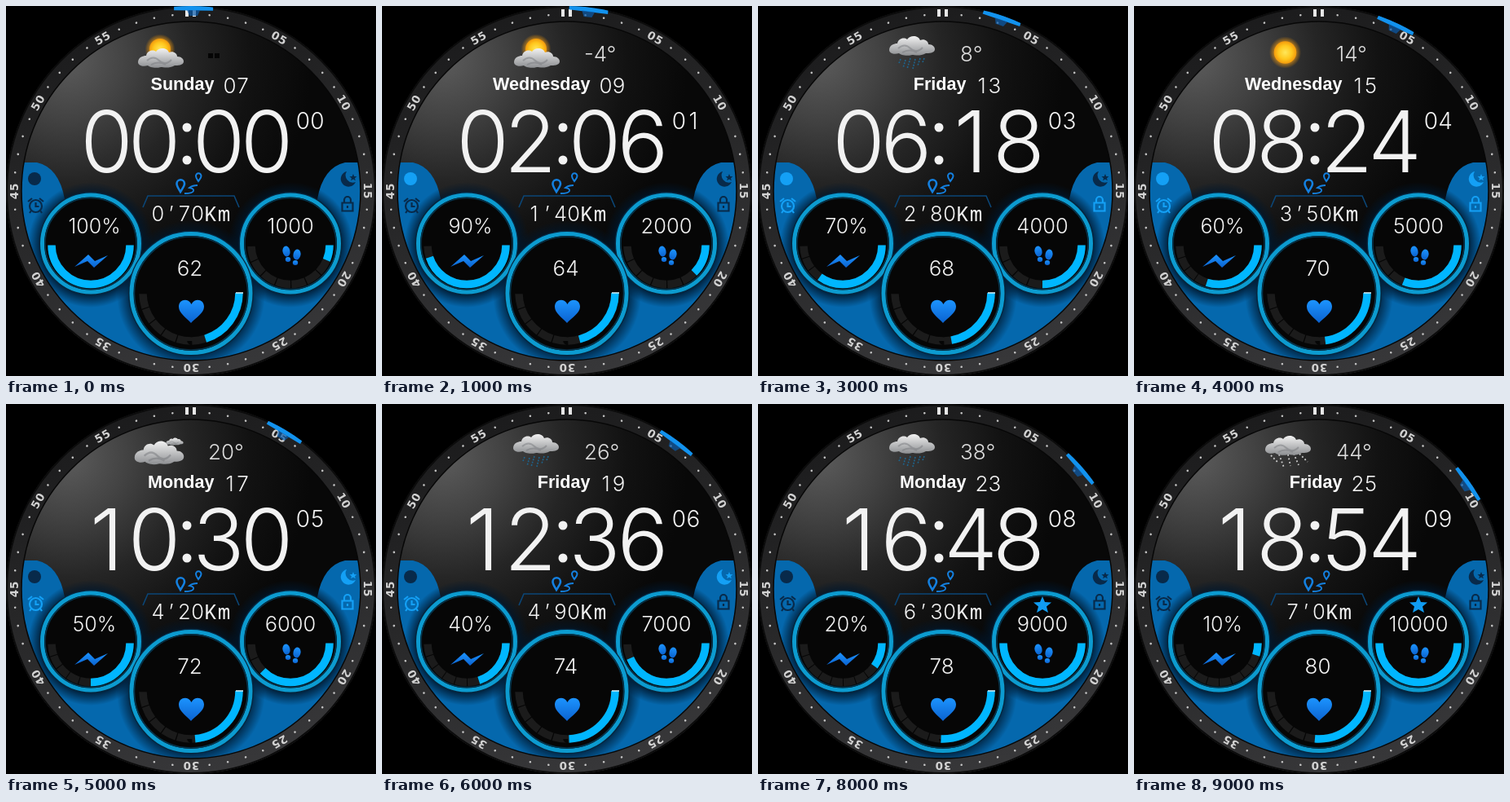
Animation, 454 px wide and 454 px high, one loop 10 s. Source, as an HTML page:

```html
<!DOCTYPE html>
<html lang="en">
<head>
<meta charset="utf-8">
<title>Watch face</title>
<style>
html, body { margin: 0; width: 100%; height: 100%; overflow: hidden; background: #000; }
svg { display: block; width: 100vw; height: 100vh; }
text { font-family: Inter, Roboto, sans-serif; font-weight: 300; fill: #f2f2f2; text-anchor: middle; }
#labels text { font: 700 13.5px "DejaVu Sans", sans-serif; fill: #d2d2d2; letter-spacing: .8px; }
#weekday { font: 700 21.6px "Liberation Sans", Arial, sans-serif; fill: #fff; text-anchor: end; }
#unit { font-family: "Noto Sans Mono", monospace; }
#temp { text-anchor: start; fill: #ddd; }
.dim, .lit { fill: none; stroke-width: 9.5; }
.dim { stroke: #1b1b1b; }
.lit { stroke: #00b6ff; }
.status { color: #082a4a; fill: none; stroke: currentColor; stroke-width: 2.2; }
.status.on { color: #14a0f5; }
.solid { fill: currentColor; stroke: none; }
#weather > g { visibility: hidden; }
</style>
</head>
<body>
<svg viewBox="0 0 454 454">
<defs>
  <clipPath id="rim"><circle cx="227" cy="227" r="227"/></clipPath>
  <clipPath id="dial"><circle cx="227" cy="227" r="208"/></clipPath>
  <linearGradient id="bezel" x1=".35" y1="0" x2=".65" y2="1">
    <stop stop-color="#1b1b1c"/><stop offset=".45" stop-color="#272728"/><stop offset="1" stop-color="#38383a"/>
  </linearGradient>
  <radialGradient id="glass" gradientUnits="userSpaceOnUse" cx="75" cy="65" r="300">
    <stop stop-color="#5c5c5c"/><stop offset=".25" stop-color="#424242"/>
    <stop offset=".5" stop-color="#252525"/><stop offset=".75" stop-color="#121212"/><stop offset="1" stop-color="#080808"/>
  </radialGradient>
  <radialGradient id="shade">
    <stop offset=".8" stop-color="#00172d" stop-opacity=".85"/><stop offset="1" stop-color="#00172d" stop-opacity="0"/>
  </radialGradient>
  <radialGradient id="sunFill">
    <stop stop-color="#ffe75a"/><stop offset=".6" stop-color="#ffc81e"/><stop offset="1" stop-color="#f39a0c"/>
  </radialGradient>
  <radialGradient id="glow">
    <stop offset=".55" stop-color="#ffad1c" stop-opacity=".8"/><stop offset="1" stop-color="#ff9a00" stop-opacity="0"/>
  </radialGradient>
  <linearGradient id="cloudFill" x1="0" y1="0" x2="0" y2="1">
    <stop stop-color="#f2f2f2"/><stop offset="1" stop-color="#8d8f92"/>
  </linearGradient>
  <linearGradient id="blueFill" x1="0" y1="0" x2="0" y2="1">
    <stop stop-color="#1c94ff"/><stop offset="1" stop-color="#0b62cf"/>
  </linearGradient>
  <g id="sun"><circle r="18.5" fill="url(#glow)"/><circle r="13" fill="url(#sunFill)"/></g>
  <g id="cloud">
    <path d="M-28 5C-28-1-22-3-18-3C-17-9-10-11-6-8C-2-14 8-13 10-7C15-9 20-6 20-2C25-2 28 1 28 4C28 9 20 9 17 9C10 13 3 11 0 11C-7 13-14 11-16 9C-22 11-28 9-28 5Z" fill="url(#cloudFill)"/>
    <path d="M-17 3Q-9-4-2 3T13 2M-12 8Q-3 3 6 8" fill="none" stroke="#77797d" stroke-opacity=".5" stroke-width="2"/>
  </g>
  <path id="rain" d="M-15 0l-2 5m8-4l-3 10m9-12l-4 13m10-12l-3 12m9-13l-3 9m8-9l-2 5" fill="none" stroke="#1d638c" stroke-width="1.6" stroke-dasharray="2 1.5"/>
</defs>

<g clip-path="url(#rim)">
  <circle cx="227" cy="227" r="227" fill="url(#bezel)"/>
  <circle cx="227" cy="227" r="226" fill="none" stroke="#0b0b0b" stroke-width="2"/>
  <circle cx="227" cy="227" r="208" fill="url(#glass)"/>
  <g clip-path="url(#dial)">
    <path d="M0 192H38Q65 198 72 237L104 291L227 340L349 291L382 237Q389 198 416 192H454V454H0Z" fill="#0568ad"/>
    <circle cx="104" cy="293" r="77" fill="url(#shade)"/>
    <circle cx="349" cy="293" r="77" fill="url(#shade)"/>
    <circle cx="227" cy="354" r="91" fill="url(#shade)"/>
  </g>
  <circle cx="227" cy="227" r="208" fill="none" stroke="#070707" stroke-width="1.5"/>
  <g id="labels"></g>
  <path d="M220 4h4v9h-4zM229 4h4v9h-4z" fill="#e8e8e8"/>
  <g id="marker">
    <path d="M203 0H251V6H203Z" transform="translate(0 -.5)" fill="#1292ee"/>
    <path d="M219 5H235L232 12H222Z" fill="#0a5cab" fill-opacity=".7"/>
  </g>
</g>

<g id="gauges"></g>

<g fill="url(#blueFill)">
  <path d="M84 320L101 305L109 313L125 306L108 321L100 313Z"/>
  <path d="M227 389C222 383 212 377 212 369C212 359 224 358 227.500 366C231 358 243 359 243 369C243 377 232 383 227 389Z"/>
  <g id="feet">
    <ellipse cx="344" cy="301" rx="4.500" ry="6.500" transform="rotate(-12 344 301)"/>
    <ellipse cx="346" cy="311" rx="3.200" ry="3" />
    <ellipse cx="357" cy="305" rx="4.500" ry="6.500" transform="rotate(12 357 305)"/>
    <ellipse cx="355" cy="315" rx="3.200" ry="3"/>
  </g>
  <path id="star" d="M349 236l3 7 8 .6-6 5 2 7.400-7-4-7 4 2-7.400-6-5 8-.6z" fill="#109cf2"/>
</g>

<path d="M168 247L174 233H280L286 247" fill="none" stroke="#0b4677" stroke-width="1.6"/>
<g fill="none" stroke="#1480e0" stroke-width="2.6">
  <path d="M214 228C211 223 209.500 221 209.500 218A4.700 4.700 0 0 1 219 218C219 221 217 223 214 228Z"/>
  <path d="M236 215C234 212 233 211 233 208.500A3.200 3.200 0 0 1 239.500 208.500C239.500 211 238 212 236 215Z" stroke-width="2"/>
  <path d="M219 229Q229 229 230 226T225 222Q229 219 235 219" stroke-width="1.8" transform="translate(0 1)"/>
</g>

<g class="status" id="link"><circle class="solid" cx="35" cy="212" r="8"/></g>
<g class="status" id="alarm">
  <circle cx="36.500" cy="245.500" r="7.500"/><path d="M36.500 241v5h4M27 240l5-4M46 240l-5-4M31 251l-2 3M42 251l2 3"/>
</g>
<g class="status" id="moon">
  <path class="solid" d="M418 203A9.500 9.500 0 1 0 429 216A9 9 0 0 1 418 203Z"/>
  <path class="solid" d="M426 206l1.200 3 3.300.2-2.500 2 .8 3-2.800-1.700-2.800 1.700.8-3-2.500-2 3.300-.2z"/>
</g>
<g class="status" id="lock">
  <path d="M412.500 241.500H425.500V251.500H412.500ZM415 241V238A4 4 0 0 1 423 238V241M419 245v3"/>
</g>

<g id="weather">
  <g id="partly"><use href="#sun" x="189" y="53"/><use href="#cloud" x="190" y="64"/></g>
  <g id="sunRain"><use href="#sun" transform="translate(204 47) scale(.75)"/><use href="#rain" x="184" y="66"/><use href="#cloud" transform="translate(186 57) scale(.9 1.05)"/></g>
  <g id="sunny"><use href="#sun" transform="translate(185.500 57) scale(1.06)"/></g>
  <g id="cloudy"><use href="#cloud" transform="translate(207 46) scale(.38)"/><use href="#cloud" transform="translate(188 60) scale(1.08 1.2)"/></g>
  <g id="snow"><use href="#cloud" transform="translate(184 52) scale(.75 1.05)"/>
    <path d="M174 65v7m-3-5l6 3m0-3l-6 3M184 69v8m-4-6l8 4m0-4l-8 4M195 65v7m-3-5l6 3m0-3l-6 3" stroke="#ddd" stroke-width="1.200"/></g>
  <g id="rainy"><use href="#rain" x="190" y="65"/><use href="#cloud" x="189" y="49"/></g>
  <g id="hail"><path d="M168 63l8 8m2-9l6 16m5-16l3 14m4-15l6 14m1-14l10 10" stroke="#ccc" stroke-width="1.800" stroke-dasharray="1.800 2.800"/><use href="#cloud" x="189" y="51"/></g>
</g>

<text id="weekday" x="255.5" y="103"></text>
<text id="temp" x="248" y="68" font-size="26"></text>
<path id="noTemp" d="M248 58h6v6h-6zM256 58h6v6h-6z" fill="#050505"/>
<text id="date" y="107" font-size="26"></text>
<text id="clock" y="204" font-size="104.5"></text>
<circle cx="222" cy="149" r="5.5" fill="#f2f2f2"/><circle cx="222" cy="189" r="5.5" fill="#f2f2f2"/>
<text id="seconds" y="151" font-size="28"></text>
<text id="distance" y="264" font-size="25.5"></text>
<text id="unit" y="264" font-size="26"></text>
<text id="battery" x="108.500" y="279" font-size="25"></text>
<text id="steps" x="349" y="279" font-size="25.500"></text>
<text id="pulse" x="225.500" y="331" font-size="26"></text>
</svg>

<script>
const $ = id => document.getElementById(id);
const pad = n => String(n).padStart(2, '0');

// Bezel numerals and minute dots
for (let m = 1; m < 60; m++) {
  const turn = `transform="rotate(${m * 6} 227 227)"`;
  $('labels').innerHTML += m % 5
    ? `<circle cx="227" cy="10" r="1.3" fill="#c4c4c4" ${turn}/>`
    : `<text x="227" y="15" ${turn}>${pad(m)}</text>`;
}

// Round gauges, each with a lower half arc measured in degrees from the right
function addGauge(name, cx, cy, radius, arcY, arcR, segments) {
  const arc = `d="M${cx + arcR} ${arcY}A${arcR} ${arcR} 0 0 1 ${cx - arcR} ${arcY}"`;
  $('gauges').innerHTML += `
    <circle cx="${cx}" cy="${cy}" r="${radius + 1.5}" fill="#05263f"/>
    <circle cx="${cx}" cy="${cy}" r="${radius - 2.5}" fill="#060606" stroke="#0c9bd0" stroke-width="5"/>
    <circle cx="${cx}" cy="${cy}" r="${radius - 6}" fill="none" stroke="#06344c" stroke-width="1.5"/>
    <path class="dim" ${arc} pathLength="${segments}" stroke-dasharray=".93 .07"/>
    <path class="lit" id="${name}Arc" ${arc} pathLength="180"/>`;
}
addGauge('battery', 104, 291.5, 62, 293.5, 48, 10);
addGauge('steps', 349, 291.5, 62, 293.5, 48, 8);
addGauge('pulse', 227, 352.5, 75.5, 352, 59, 10);
$('gauges').innerHTML += '<path d="M282 352h9" stroke="#d5f3ff" stroke-width="1.5"/>';

const setArc = (name, degrees) =>
  $(name + 'Arc').setAttribute('stroke-dasharray', `${degrees} 400`);

function setCells(id, text, centres) {
  $(id).setAttribute('x', centres.join(' '));
  $(id).textContent = text;
}

const skies = ['partly', 'partly', 'sunRain', 'rainy', 'sunny', 'cloudy', 'rainy', 'snow', 'rainy', 'hail'];
const weekdays = ['Friday', 'Wednesday', 'Monday'];
const statusStart = { link: 1, lock: 2, alarm: 3, moon: 4 };

function show(n) {
  const battery = 100 - 10 * n, steps = 1000 * (n + 1), pulse = 62 + 2 * n;
  const metres = 70 * (n + 1);

  setCells('clock', pad(2 * n) + pad(6 * n), [123.5, 182, 261, 320]);
  setCells('seconds', pad(n), [364.5, 382]);
  setCells('date', pad(7 + 2 * n), [274.5, 290.5]);
  $('weekday').textContent = n ? weekdays[n % 3] : 'Sunday';
  $('temp').textContent = n ? `${6 * n - 10}°` : '';
  $('noTemp').style.visibility = n ? 'hidden' : 'visible';

  const distance = `${Math.floor(metres / 100)}’${metres % 100 || 0}`;
  const left = 227 - (distance.length + 1) * 8.1;
  const cell = (_, i) => left + i * 16.2;
  setCells('distance', distance, [...distance].map(cell));
  setCells('unit', 'Km', [0, 1].map(i => cell(0, distance.length + i)));

  $('battery').textContent = battery + '%';
  $('steps').textContent = steps;
  $('pulse').textContent = pulse;
  setArc('battery', battery * 1.8);
  setArc('steps', Math.min(180, steps * 180 / 8000));
  setArc('pulse', 90 + (pulse - 76) * 1.25);

  $('star').style.visibility = steps >= 8000 ? 'visible' : 'hidden';
  $('marker').setAttribute('transform', `rotate(${n * 6 + .8} 227 227)`);
  for (const id in statusStart)
    $(id).classList.toggle('on', n >= statusStart[id] && n < statusStart[id] + 4);
  for (const sky of $('weather').children)
    sky.style.visibility = sky.id === skies[n] ? 'visible' : 'hidden';
}

let shown = -1;
function tick() {
  const n = Math.floor(performance.now() / 1000) % 10;
  if (n !== shown) show(shown = n);
  requestAnimationFrame(tick);
}
tick();
</script>
</body>
</html>
```
